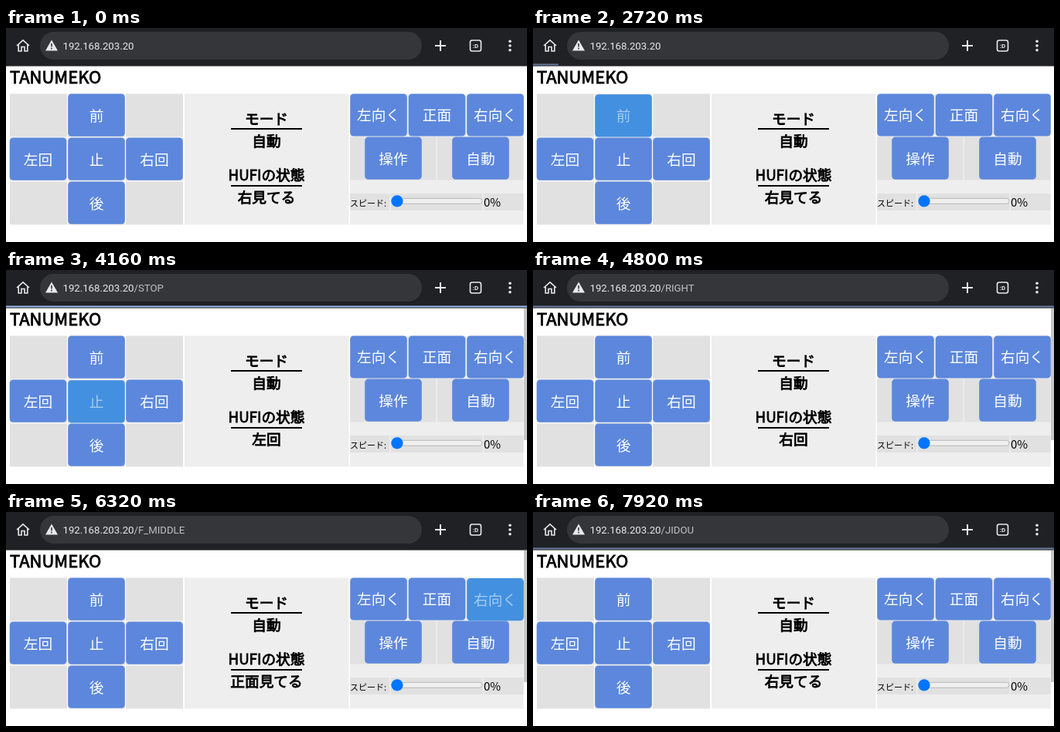
An HTML page that plays this animation: 674 by 278 pixels, repeating every 8 s.

```html
<!DOCTYPE html>
<html lang="ja">
<head>
<meta charset="utf-8">
<title>Robot remote</title>
<style>
  html, body { margin: 0; width: 100%; height: 100%; overflow: hidden; background: #fff; }
  svg { display: block; width: 674px; height: 278px; }
  text { font-family: "Noto Sans CJK JP", "Noto Sans CJK", sans-serif; font-size: 18.7px; }
  .bold { stroke: #000; stroke-width: .85px; }
  .mid { text-anchor: middle; }
  .url { font-family: Roboto, sans-serif; font-size: 13.2px; fill: #e8eaed; }
  .path { fill: #bdc0c4; }
  .button rect { fill: #5c87dc; }
  .button text { fill: #fff; text-anchor: middle; }
  .pressed { transform: translateY(.7px); }
  .pressed rect { fill: #4390e0; }
  .pressed text { fill: #a4cbf1; }
</style>
</head>
<body>
<svg viewBox="0 0 674 278">
  <rect width="674" height="49.600" fill="#202124"/>
  <rect x="44" y="5" width="494" height="36" rx="18" fill="#35363a"/>
  <g fill="none" stroke="#e8eaed" stroke-width="1.600">
    <path d="M14 23 22 15.800l8 7.200M16.200 21.500v8.500h3.800v-5.500h4v5.500h3.800v-8.500"/>
    <path d="M555 23h14M562 16v14" stroke-width="2"/>
    <rect x="600.500" y="16" width="14" height="14" rx="2.500"/>
  </g>
  <path d="M59 15.500 67 29.500H51Z" fill="#e8eaed"/>
  <path d="M59 20v4.500M59 25.700v1.700" stroke="#35363a" stroke-width="1.600"/>
  <text class="url mid" x="607.500" y="26" style="font-size:8px;font-weight:700">:D</text>
  <g fill="#e8eaed">
    <circle cx="652" cy="17.300" r="1.800"/><circle cx="652" cy="23" r="1.800"/><circle cx="652" cy="28.700" r="1.800"/>
  </g>
  <text class="url" x="73.500" y="27.800">192.168.203.20<tspan class="path" id="path"></tspan></text>
  <rect id="bar" y="46.500" height="2" fill="#9dbcf3"/>

  <text class="bold" x="5" y="71.600" style="font-size:22px">TANUMEKO</text>
  <g id="cells"></g>
  <g class="mid">
    <text class="bold" x="337" y="124.500">モード</text>
    <text class="bold" x="337" y="153.500" id="mode"></text>
    <text class="bold" x="337" y="197.500">HUFIの状態</text>
    <text class="bold" x="337" y="226.500" id="state"></text>
    <path d="M291 131h92M291 205h92" stroke="#000" stroke-width="1.800"/>
  </g>
  <text x="445" y="232" style="font-size:11px">スピード:</text>
  <rect x="498.500" y="221.300" width="117.500" height="7" rx="3.500" fill="#efefef" stroke="#b8b8b8"/>
  <circle cx="506" cy="224.800" r="7.600" fill="#0075ff"/>
  <text x="618" y="232.300" style="font-size:15px">0%</text>
  <g id="buttons"></g>
  <rect id="scroll" x="670" y="50" width="4" height="171" fill="#c6c6c6"/>
</svg>
<script>
const $ = id => document.getElementById(id);
const LOOP = 8000;

function add(parent, tag, attrs, text = '') {
  const node = document.createElementNS('http://www.w3.org/2000/svg', tag);
  for (const key in attrs) node.setAttribute(key, attrs[key]);
  node.textContent = text;
  parent.append(node);
  return node;
}

const cell = (x, y, width, height, fill) => add($('cells'), 'rect', { x, y, width, height, fill });
cell(231, 85.5, 212.5, 170, '#eee');
cell(445, 85.5, 224.5, 170, '#eee');
for (const x of [5, 80, 155])
  for (const y of [85.5, 142.5, 199.5]) cell(x, y, 74, 56, '#e1e1e1');
for (const x of [445, 558]) cell(x, 141.5, 111.5, 56, '#e1e1e1');
for (const [x, w] of [[445, 51], [497.5, 119], [618, 51.5]]) cell(x, 215, w, 22, '#e1e1e1');

const buttons = {};
function button(label, x, y) {
  const group = add($('buttons'), 'g', { class: 'button' });
  add(group, 'rect', { x, y, width: 73.6, height: 55.2, rx: 4.5 });
  add(group, 'text', { x: x + 36.8, y: y + 35 }, label);
  buttons[label] = group;
}
button('前', 80.2, 85.6);
button('左回', 4.7, 142.6);
button('止', 80.2, 142.6);
button('右回', 155.2, 142.6);
button('後', 80.2, 199.6);
button('左向く', 445.2, 85.4);
button('正面', 520.7, 85.4);
button('右向く', 596.2, 85.4);
button('操作', 464.2, 141.6);
button('自動', 577.2, 141.6);

// press time, button, path, what the page then shows
const taps = [
  [2640, '前', '/FORWARD', { state: '前' }],
  [3360, '左回', '/LEFT', { state: '左回' }],
  [4000, '止', '/STOP', { state: '止' }],
  [4480, '右回', '/RIGHT', { state: '右回' }],
  [5040, '後', '/BACKWARD', { state: '後' }],
  [5520, '左向く', '/F_LEFT', { state: '左見てる' }],
  [5840, '正面', '/F_MIDDLE', { state: '正面見てる' }],
  [6320, '右向く', '/F_RIGHT', { state: '右見てる' }],
  [6800, '操作', '/SOUSA', { mode: '操作' }],
  [7600, '自動', '/JIDOU', { mode: '自動' }],
];
const BAR = 80, URL_SET = 160, RELEASE = 240, LOADED = 320, FADED = 480;

function render(time) {
  const view = { mode: '自動', state: '右見てる', path: '', scroll: 0, width: 0, opacity: 0, pressed: '' };
  for (const [start, label, path, page] of taps) {
    const age = time - start;
    if (age < 0) break;
    if (age < RELEASE) view.pressed = label;
    if (age >= URL_SET) view.path = path;
    if (age >= LOADED) Object.assign(view, page, { scroll: 1 });
    if (age >= BAR && age < FADED) {
      view.width = age < URL_SET ? 33 : 674;
      view.opacity = age < URL_SET ? .55 : age < LOADED ? 1 : .6 * (FADED - age) / (FADED - LOADED);
    } else view.opacity = 0;
  }
  for (const id of ['mode', 'state', 'path']) $(id).textContent = view[id];
  for (const label in buttons) buttons[label].classList.toggle('pressed', label === view.pressed);
  $('bar').setAttribute('width', view.width);
  $('bar').setAttribute('opacity', view.opacity);
  $('scroll').setAttribute('opacity', view.scroll);
}

const origin = performance.now();
function tick() {
  render((performance.now() - origin) % LOOP);
  requestAnimationFrame(tick);
}
tick();
</script>
</body>
</html>
```
